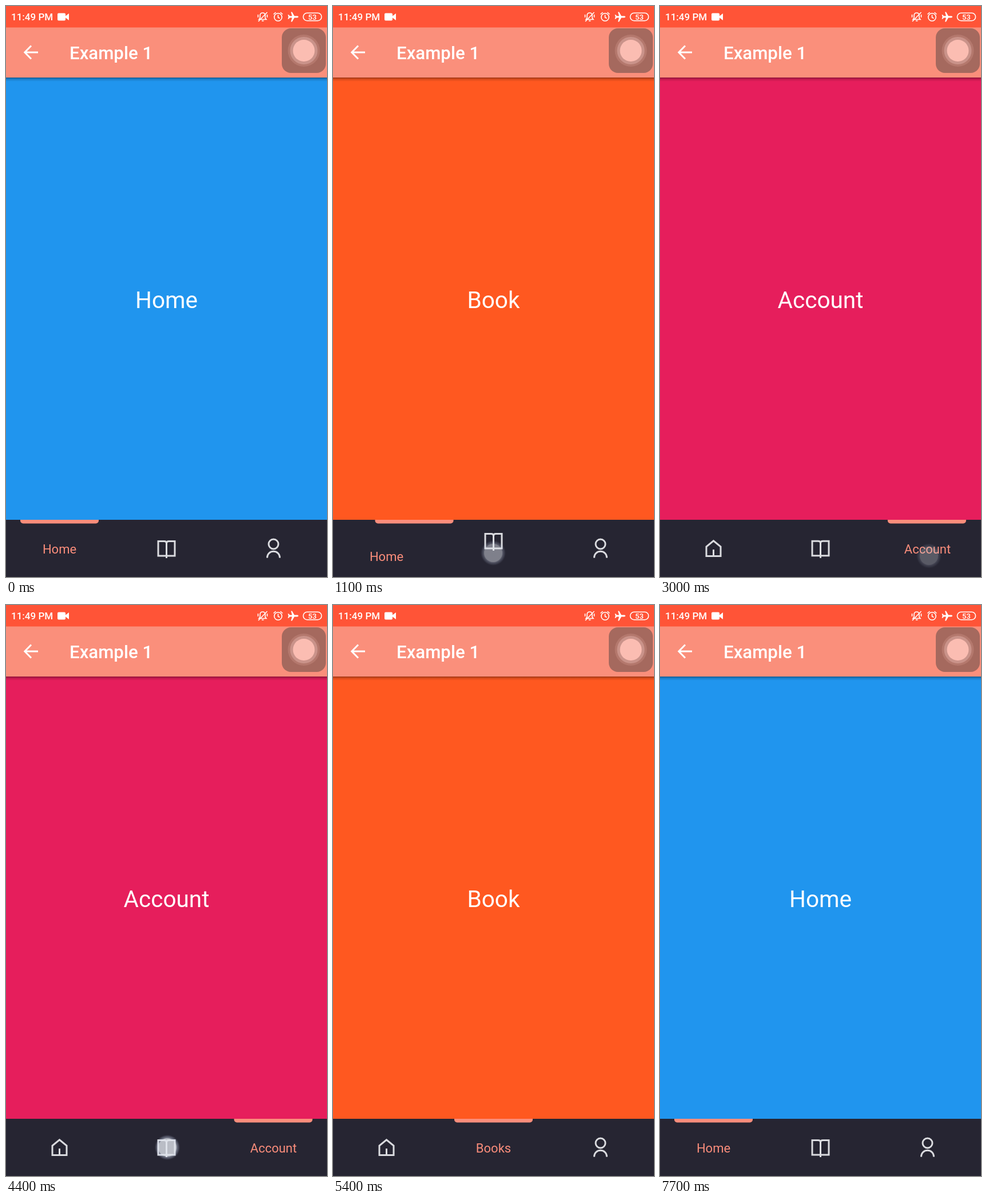
An HTML page for the animation above (7.8 s loop, 561 px wide and 998 px high).

```html
<!DOCTYPE html>
<html lang="en">
<head>
<meta charset="utf-8">
<title>Tab bar</title>
<style>
  html, body { margin: 0; width: 100%; height: 100%; overflow: hidden; background: #262532; }
  svg { display: block; width: 100%; height: 100%; font-family: Roboto, sans-serif; }
  .line { fill: none; stroke: #fff; }
  .icon { fill: none; stroke: #dadbdf; stroke-width: 3; }
  .label { fill: #fa8d7b; font-size: 22px; text-anchor: middle; }
</style>
</head>
<body>
<svg viewBox="0 0 561 998">
  <defs>
    <clipPath id="barClip"><rect y="898" width="561" height="100"/></clipPath>
    <linearGradient id="shade" x2="0" y2="1">
      <stop stop-opacity=".4"/><stop offset=".4" stop-opacity=".16"/><stop offset="1" stop-opacity="0"/>
    </linearGradient>
    <radialGradient id="glow">
      <stop offset=".68" stop-color="#dfe6f5" stop-opacity=".6"/>
      <stop offset="1" stop-color="#b9c8ea" stop-opacity="0"/>
    </radialGradient>
  </defs>

  <rect id="page" width="561" height="898"/>
  <text id="heading" x="280.5" y="528" font-size="40.5" fill="#fff" text-anchor="middle"></text>

  <rect y="125" width="561" height="7" fill="url(#shade)"/>
  <rect y="37" width="561" height="88" fill="#fa8f7b"/>
  <rect width="561" height="37.5" fill="#ff5437"/>
  <path class="line" stroke-width="3" d="M56 81H33M44 69.5L32.8 81L44 92.5"/>
  <text x="111" y="93" font-size="31.2" font-weight="500" fill="#fff">Example 1</text>

  <!-- status bar -->
  <text x="9" y="25" font-size="17" font-weight="500" fill="#fff">11:49 PM</text>
  <path fill="#fff" d="M92 12.500H102Q104 12.500 104 14.500V17.500L110 13V25L104 20.500V23.500Q104 25.500 102 25.500H92Q90 25.500 90 23.500V14.500Q90 12.500 92 12.500Z"/>
  <g class="line" stroke-width="1.6">
    <path d="M442 23.500H455L453 21V17Q453 12 448.500 12T444 17V21ZM447 26H450.500M441 27L456.500 11M440.500 15V20M456.500 15V20"/>
    <circle cx="475.500" cy="19.500" r="6.700"/>
    <path d="M475.500 15.500V20L478.500 21.500M467.500 14.500L471.500 11M483.500 14.500L479.500 11"/>
    <rect x="519.500" y="12.300" width="32" height="13.400" rx="6.500"/>
  </g>
  <path fill="#fff" d="M511 19Q511 17.600 509 17.600H504L500 10.500H498L500 17.600H496L494 15.200H492.500L493.700 19L492.500 22.800H494L496 20.400H500L498 27.500H500L504 20.400H509Q511 20.400 511 19Z"/>
  <text x="535.500" y="23.700" font-size="13" font-weight="500" fill="#fff" text-anchor="middle">53</text>

  <!-- floating assist button -->
  <rect x="482" y="39" width="77" height="78" rx="16" fill="#a5695e"/>
  <circle cx="520.500" cy="78" r="28" fill="#b4786d"/>
  <circle cx="520.500" cy="78" r="24" fill="#ca938a"/>
  <circle cx="520.500" cy="78" r="19" fill="#fbbdb2"/>

  <g clip-path="url(#barClip)">
    <rect y="898" width="561" height="100" fill="#262532"/>
    <rect id="marker" y="884" width="137" height="20.500" rx="5" fill="#fa8d7b"/>
    <path class="icon" d="M81 961.500V945L93.500 934.800L106 945V961.500ZM93.500 950V961"/>
    <path class="icon" d="M280.500 965V939Q280.500 935.500 276.500 935.500H266V961H295V935.500H284.500Q280.500 935.500 280.500 939"/>
    <path class="icon" d="M459 940.500a8.500 8.500 0 1 0 17 0a8.500 8.500 0 1 0 -17 0M456.500 964.500C456.500 949.500 478.500 949.500 478.500 964.500"/>
    <text class="label" x="93.500" y="957">Home</text>
    <text class="label" x="280.500" y="957">Books</text>
    <text class="label" x="467.500" y="957">Account</text>
  </g>

  <g id="touch">
    <circle r="22" fill="url(#glow)"/>
    <circle r="16" fill="#dfe1e6" fill-opacity=".5"/>
  </g>
</svg>
<script>
const LOOP = 7800, TAB_WIDTH = 187, BAR_HEIGHT = 100;
const pages = [['Home', '#2095ee'], ['Book', '#ff5820'], ['Account', '#e61e5c']];
const taps = [
  { at: 1033, from: 0, to: 1, x: 280, y: 956 },
  { at: 2740, from: 1, to: 2, x: 470, y: 961 },
  { at: 4437, from: 2, to: 1, x: 282, y: 948 },
  { at: 6370, from: 1, to: 0, x: 98, y: 961 }
];
const byId = id => document.getElementById(id);
const page = byId('page'), heading = byId('heading'), marker = byId('marker'), touch = byId('touch');
const icons = document.querySelectorAll('.icon'), labels = document.querySelectorAll('.label');

// cubic-bezier(.42, 0, .58, 1)
function easeInOut(x) {
  if (x <= 0) return 0;
  if (x >= 1) return 1;
  let low = 0, high = 1, u;
  for (let i = 0; i < 20; i++) {
    u = (low + high) / 2;
    if (1.26 * u - .78 * u * u + .52 * u ** 3 < x) low = u; else high = u;
  }
  return 3 * u * u - 2 * u ** 3;
}

// Full while pressed, then dimmed and fading after release
function touchOpacity(age) {
  if (age < -145 || age > 370) return 0;
  if (age < 0) return 1;
  return age < 180 ? .6 : .6 * (370 - age) / 190;
}

function draw(now) {
  const t = now % LOOP;
  const tap = taps.filter(tap => t >= tap.at - 200).pop() || { ...taps[0], at: LOOP };
  const age = t - tap.at;
  const swap = easeInOut(age / 270);
  const slide = easeInOut((age + 47) / 326);

  const [title, color] = pages[age < 0 ? tap.from : tap.to];
  page.setAttribute('fill', color);
  heading.textContent = title;
  marker.setAttribute('x', 25 + TAB_WIDTH * (tap.from + (tap.to - tap.from) * slide));

  for (let i = 0; i < 3; i++) {
    const active = i === tap.to ? swap : i === tap.from ? 1 - swap : 0;
    icons[i].setAttribute('transform', `translate(0 ${-BAR_HEIGHT * active})`);
    labels[i].setAttribute('transform', `translate(0 ${BAR_HEIGHT * (1 - active)})`);
  }

  touch.setAttribute('transform', `translate(${tap.x} ${tap.y})`);
  touch.setAttribute('opacity', touchOpacity(age));
}

const start = performance.now();
function tick() {
  draw(performance.now() - start);
  requestAnimationFrame(tick);
}
tick();
</script>
</body>
</html>
```
